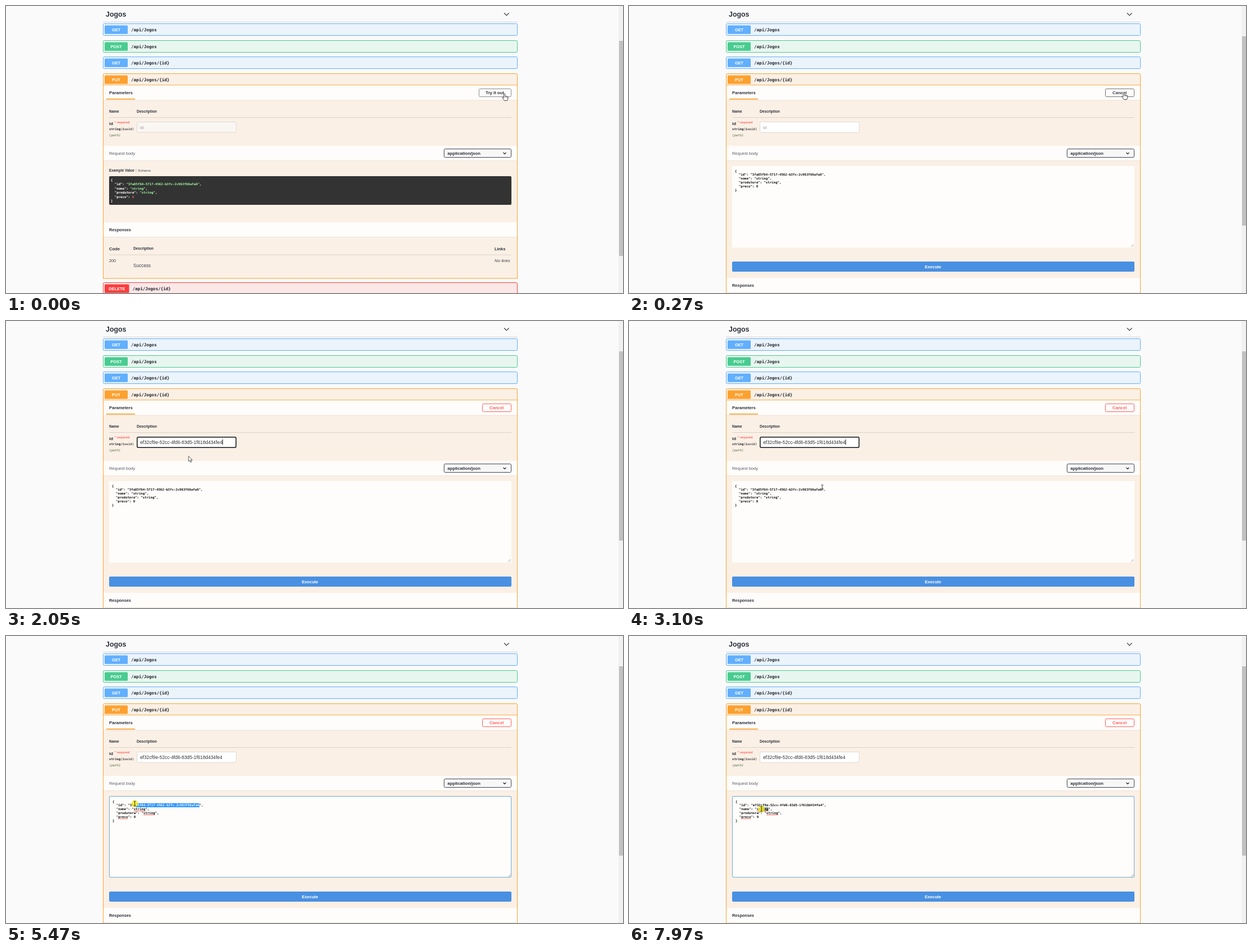
Recreate the animation shown at these times as an HTML page. Size 1095 by 511 pixels, loop 8000 ms.

```html
<!DOCTYPE html>
<html lang="en">
<head>
<meta charset="utf-8">
<title>API console</title>
<style>
  html, body { margin: 0; height: 100%; overflow: hidden; background: #fafafa; }
  svg { display: block; }
  text { white-space: pre; font-family: "Liberation Sans", Arial, sans-serif; fill: #3b4151; }
  .b { font-weight: bold; fill: #2b303b; }
  .m { font-family: "DejaVu Sans Mono", monospace; font-weight: bold; fill: #20242c; }
  .i { font-style: italic; }
  .c { text-anchor: middle; }
</style>
</head>
<body>
<svg width="1095" height="511" viewBox="0 0 1095 511"><g id="page"></g><g id="live"></g></svg>
<script>
const LOOP = 8000, TICK = 65.8, CHAR = 3.43, MONO = 5.7;
const EDIT = 270, FOCUS = 930, PASTE = 1650, DRAG = 5010, RELEASE = 5870, REPLACE = 6920, RESELECT = 7770;
const ORANGE = '#fca130', BEIGE = '#fbf0e5', PAPER = '#fefdfb', RULE = '#dcd2c8';
const SAMPLE_ID = '3fa85f64-5717-4562-b3fc-2c963f66afa6';
const PASTED_ID = 'ef32cf9e-52cc-4fd6-83d5-1f618d434fe4';

const rect = (x, y, w, h, fill, stroke = 'none', r = 0, sw = 1) =>
  `<rect x="${x}" y="${y}" width="${w}" height="${h}" rx="${r}" fill="${fill}" stroke="${stroke}" stroke-width="${sw}"/>`;
const path = (d, stroke, sw = 1, fill = 'none') =>
  `<path d="${d}" stroke="${stroke}" stroke-width="${sw}" fill="${fill}" stroke-linejoin="round"/>`;
// y is the middle of the line of text
const text = (x, y, s, size, cls = '', fill = '') =>
  `<text x="${x}" y="${y + size * .36}" font-size="${size}" class="${cls}" ${fill && `style="fill:${fill}"`}>${s}</text>`;
const span = (s, fill) => `<tspan fill="${fill}">${s}</tspan>`;
const rule = y => path(`M183 ${y}H897`, RULE);
const strip = (y, h) => rect(173, y, 734, h, PAPER) + path(`M173 ${y + h + .5}H907`, '#ebe3db');

function operation(y, method, url, color, tint, height = 21, badge = 41) {
  return rect(172.5, y, 735, height, tint, color, 2) +
    rect(175, y + 3, badge, 15.3, color, 'none', 1.5) +
    text(175 + badge / 2, y + 10.7, method, 7.4, 'b c', '#fff') +
    text(badge + 181, y + 10.7, url, 7.55, 'm');
}

function header() {
  return text(177, 15, 'Jogos', 12.4, 'b') +
    path('M884 12.5l4.3 4.3 4.3-4.3', '#333', 1.1) +
    path('M172 28.5H908', '#d2d3d6') +
    operation(31.5, 'GET', '/api/Jogos', '#61affe', '#ebf3fb') +
    operation(61.5, 'POST', '/api/Jogos', '#49cc90', '#e8f6f0') +
    operation(90.5, 'GET', '/api/Jogos/{id}', '#61affe', '#ebf3fb') +
    operation(120.5, 'PUT', '/api/Jogos/{id}', ORANGE, BEIGE, 400) +
    path('M173 140.8H907', ORANGE) + strip(141.5, 26) +
    text(183, 154.7, 'Parameters', 7.7, 'b') +
    rect(178, 164.8, 51, 1.8, ORANGE) +
    text(183, 188, 'Name', 6.5, 'b') + text(232, 188, 'Description', 6.5, 'b') + rule(198.5) +
    text(183, 209, 'id', 8, 'b') + text(192.5, 207, '* required', 6.2, '', '#ff3b3b') +
    text(183, 219, `string${span('($uuid)', '#555')}`, 5.65, 'm') +
    text(183, 229.5, '<tspan font-weight="normal">(path)</tspan>', 5.7, 'm i', '#47683c') +
    strip(249, 26) + text(183, 262, 'Request body', 7.45, '', '#5b5f69') +
    rect(777.5, 254.5, 119, 15, '#f7f7f7', '#41444e', 2) +
    text(783.5, 262, 'application/json', 7.7, 'b') +
    path('M882.5 261l2.5 2.5 2.5-2.5', '#222', 1.1) +
    rect(1087, 0, 8, 511, '#f1f1f1');
}

function jsonLines(x, y, step, lines, fill = '') {
  return ['{', ...lines.map(s => '  ' + s), '}']
    .map((s, i) => text(x, y + i * step, s, MONO, 'm', fill)).join('');
}

function readView() {
  const green = s => span(`"${s}"`, '#a2fca2');
  return rect(839.5, 147.5, 57, 14, PAPER, '#8c8c8c', 2) +
    text(867.6, 154.7, 'Try it out', 7.7, 'b c') +
    text(183, 292.7, 'Example Value', 6.4, 'b') + path('M230.8 290v6', '#aaa', .7) +
    text(234, 292.7, 'Schema', 6.2) +
    rect(183, 303, 714, 51, '#333', 'none', 2) +
    jsonLines(186, 310, 7.4, [
      `"id": ${green(SAMPLE_ID)},`, `"nome": ${green('string')},`,
      `"produtora": ${green('string')},`, `"preco": ${span(0, '#d36363')}`], '#fff') +
    strip(385, 26) + text(183, 398, 'Responses', 7.3, 'b') +
    text(183, 432, 'Code', 7.6, 'b') + text(226, 432, 'Description', 6.5, 'b') +
    text(867, 432, 'Links', 7.4, 'b') + rule(443) +
    text(183, 453, '200', 7.3) + text(226, 461.7, 'Success', 8.2) +
    text(867, 453, 'No links', 7.8, 'i') +
    rect(171, 485.5, 738, 26, '#fafafa') + path('M172.5 480v3.5q0 1.5 2 1.5H905.5q2 0 2-1.5V480', ORANGE) +
    operation(492.5, 'DELETE', '/api/Jogos/{id}', '#f93e3e', '#fce7e7', 30, 43.5) +
    rect(1088, 62, 7, 383, '#c1c1c1');
}

const clamp = (v, lo, hi) => Math.min(hi, Math.max(lo, v));
const mix = (a, b, k) => `rgb(${a.map((v, i) => Math.round(v + (b[i] - v) * k))})`;
const blink = (t, from) => (t - from) % 1000 < 500;
const caret = (x, y, h) => rect(x, y, 1, h, '#111');

function cancelButton(t) {
  const k = clamp((t - EDIT) / 300, 0, 1), red = [255, 96, 96];
  return rect(845.5, 147.5, 51, 14, PAPER, mix([115, 115, 115], red, k), 2) +
    text(870.7, 154.7, 'Cancel', 7.7, 'b c', mix([59, 65, 81], red, k));
}

function idField(t) {
  const focused = t >= FOCUS && t < DRAG, filled = t >= PASTE;
  const on = filled ? blink(t, PASTE) : t < 1460;
  return (focused
      ? rect(232.75, 206.75, 175.5, 18.5, '#fff', '#111', 2, 1.5)
      : rect(232.5, 206.5, 176, 18.5, t >= EDIT ? '#fff' : '#faf6f2', '#dcdad8', 2)) +
    text(238, 215.8, filled ? PASTED_ID : 'id', filled ? 8.3 : 7.8, '', filled ? '#333' : '#999') +
    (focused && on ? caret(filled ? 384 : 238, 211, 9) : '');
}

function bodyEditor(t, x) {
  const active = t >= DRAG, replaced = t >= REPLACE, shift = active ? 1 : 0;
  const left = 188 + shift, top = 293.5 + shift, col = n => left + n * CHAR;
  const id = replaced ? PASTED_ID : SAMPLE_ID;
  const reach = t < RELEASE ? x : 0;
  const from = active && !replaced ? clamp(Math.round((reach - col(9)) / CHAR), 0, 36) : 36;
  const nameFrom = t >= RESELECT ? clamp(Math.round((x - col(11)) / CHAR), 0, 6) : 6;
  const underline = (n, count, y) => path(`M${col(n)} ${y}h${count * CHAR}`, '#e8483c', .8);
  return (active
      ? rect(183.5, 285.5, 713, 144, PAPER, '#6fa9d8', 1.5)
      : rect(183, 285, 714, 145, PAPER, 'none', 1.5)) +
    path('M891 428.5l4.5-4.5M893.5 428.5l2-2', '#888', .7) +
    rect(col(9 + from), top + 3.3, (36 - from) * CHAR, 7, '#1e90ff') +
    rect(col(11 + nameFrom), top + 10.3, (6 - nameFrom) * CHAR, 7, '#8ea6a0') +
    jsonLines(left, top, 6.9, [
      `"id": "${id.slice(0, from)}${span(id.slice(from), '#fff')}",`,
      '"nome": "string",', '"produtora": "string",', '"preco": 0'], '#111') +
    (active ? underline(11, 6, 311.6) + underline(16, 6, 318.5) + underline(3, 5, 325.4) : '') +
    (replaced && t < RESELECT && blink(t, REPLACE) ? caret(344, 298, 7) : '');
}

function editView(t, x) {
  return cancelButton(t) + bodyEditor(t, x) +
    rect(183, 455, 714, 18, '#4990e2', 'none', 2) +
    text(539.5, 464, 'Execute', 7.6, 'b c', '#fff') +
    strip(484, 26) + text(183, 497, 'Responses', 7.3, 'b') +
    rect(1088, 54, 7, 337, '#c1c1c1');
}

// pointer stops: time, x, y
const STOPS = [
  [0, 884.5, 155.5], [140, 884.5, 155.5], [270, 878.5, 153.5], [790, 265.5, 214], [1850, 265.5, 214],
  [2050, 324, 241], [2250, 320, 257], [2375, 320, 257], [3230, 344.5, 301], [3490, 341.5, 304.5],
  [3565, 341.5, 304.5], [3760, 336.5, 304], [3885, 336.5, 304], [4350, 347, 298], [4545, 347, 298],
  [4810, 345.5, 300], [5010, 345.5, 300], [5470, 228.5, 298.5], [5800, 221, 299.5], [5870, 226.5, 302],
  [6065, 226.5, 302], [6190, 214.5, 299], [6455, 214.5, 299], [6520, 223.5, 303], [6850, 223.5, 303],
  [6920, 225, 304], [7700, 247, 309.5], [7770, 247, 309.5], [7970, 235, 308], [LOOP, 235, 308]];

// smooth curve through the stops that rests at every pause and turn
function pointerAt(t) {
  const n = STOPS.findIndex(s => s[0] > t), start = STOPS[n - 1], end = STOPS[n];
  const span = end[0] - start[0], k = (t - start[0]) / span;
  const speed = (i, axis) => {
    const p = STOPS[i - 1], q = STOPS[i], r = STOPS[i + 1];
    if (!p || !r) return 0;
    const a = (q[axis] - p[axis]) / (q[0] - p[0]), b = (r[axis] - q[axis]) / (r[0] - q[0]);
    return a * b > 0 ? 2 * a * b / (a + b) : 0;
  };
  return [1, 2].map(axis => {
    const ease = k * k * (3 - 2 * k);
    return start[axis] + (end[axis] - start[axis]) * ease +
      span * k * (1 - k) * (speed(n - 1, axis) * (1 - k) - speed(n, axis) * k);
  });
}

const CURSORS = {
  hand: path('M-1.2 .8Q0-.8 1.2.8V5l4.6 1q1 .3.8 1.5L6 10.5 5 13H0L-3.4 8.3q-.2-1.6 1.2-1.1l1 .8Z', '#333', .9, '#fff') +
    path('M1.2 5v2.5M3.3 5.6v2M5 6v1.8', '#333', .6),
  arrow: path('M0 0V9.3L2.2 7.3 3.8 10.8 5.3 10.1 3.7 6.7H6.7Z', '#333', .8, '#fff'),
  beam: path('M-2-4.5Q0-4.5 0-3.5 0-4.5 2-4.5M0-3.5v7M-2 4.5Q0 4.5 0 3.5 0 4.5 2 4.5', '#222', .9)
};

function cursorOver(x, y) {
  const inside = (l, t, r, b) => x >= l && x < r && y >= t && y < b;
  if (inside(839, 147, 897, 162)) return 'hand';
  return inside(232, 206, 409, 226) || inside(183, 285, 897, 430) ? 'beam' : 'arrow';
}

function pointer(t, x, y) {
  const held = [[140, EDIT], [FOCUS, 990], [DRAG, RELEASE], [RESELECT, LOOP]].some(([a, b]) => t >= a && t < b);
  return (held ? `<circle cx="${x}" cy="${y}" r="6" fill="#f4ec1c" opacity=".8"/>` : '') +
    `<g transform="translate(${x} ${y})">${CURSORS[cursorOver(x, y)]}</g>`;
}

const page = document.getElementById('page'), live = document.getElementById('live');
page.innerHTML = header();

function frame() {
  const t = performance.now() % LOOP;
  const tick = Math.max(0, Math.floor((t - 4) / TICK) * TICK + 8);
  const [x, y] = pointerAt(Math.min(tick, LOOP - 1));
  live.innerHTML = idField(t) + (t < EDIT ? readView() : editView(t, x)) + pointer(t, x, y);
  requestAnimationFrame(frame);
}
frame();
</script>
</body>
</html>
```
